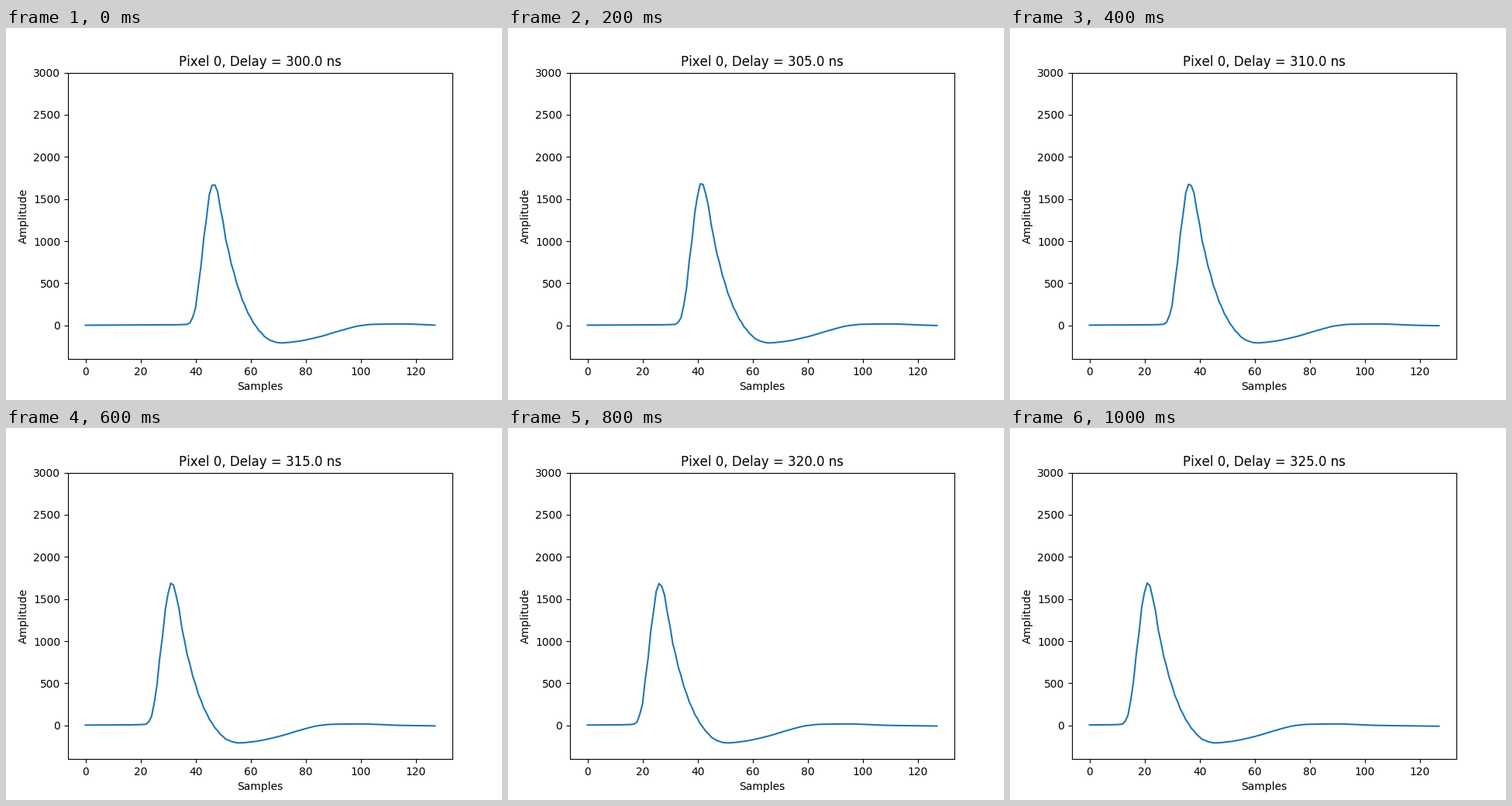
A matplotlib script for the animation above (1200 ms loop, 640 by 480 pixels).

```python
import numpy as np
import matplotlib.pyplot as plt
from matplotlib.animation import FuncAnimation

FRAMES, INTERVAL = 6, 200
SAMPLES = np.arange(128)
SHIFT = 5.07     # samples the pulse moves earlier per step
ODD_SKEW = 0.15  # odd samples are taken slightly late

# Key points (time, amplitude) of the pulse at the shortest delay
KEY_T, KEY_Y = np.array([
    (0, 2), (30, 6), (37, 12), (38.4, 45), (40, 205), (42.15, 750),
    (44.2, 1330), (45.3, 1575), (46.5, 1690), (47.5, 1645), (49.2, 1385),
    (51.15, 1015), (54.2, 600), (57.1, 305), (60.1, 90), (63.2, -62),
    (67, -174), (71, -208), (77, -190), (85, -136), (93, -60), (100, -3),
    (105, 13), (115, 17), (130, 0), (153, -10),
]).T


def smooth_curve(t, x, y):
    """Monotone cubic curve through the points (x, y)."""
    h = np.diff(x)
    d = np.diff(y) / h
    a, b = d[:-1], d[1:]
    inner = np.where(a * b > 0, 2 * a * b / (np.abs(a) + np.abs(b)), 0)
    m = np.concatenate(([d[0]], inner * np.sign(a), [d[-1]]))
    k = np.clip(np.searchsorted(x, t, side="right") - 1, 0, len(h) - 1)
    s = (t - x[k]) / h[k]
    blend = s * s * (3 - 2 * s)
    bend = s * (1 - s) * (m[k] * (1 - s) - m[k + 1] * s)
    return y[k] + blend * (y[k + 1] - y[k]) + h[k] * bend


def waveform(step):
    time = SAMPLES + ODD_SKEW * (SAMPLES % 2) + SHIFT * step
    return smooth_curve(time, KEY_T, KEY_Y)


plt.rcParams["text.kerning_factor"] = 6
fig, ax = plt.subplots(figsize=(6.4, 4.8), dpi=100)
line, = ax.plot(SAMPLES, waveform(0))
ax.set_ylim(-400, 3000)
ax.set_xlabel("Samples")
ax.set_ylabel("Amplitude")
title = ax.set_title("")


def update(step):
    line.set_ydata(waveform(step))
    title.set_text(f"Pixel 0, Delay = {300 + 5 * step:.1f} ns")
    return line, title


anim = FuncAnimation(fig, update, frames=FRAMES, interval=INTERVAL,
                     repeat=True, repeat_delay=0)
plt.show()
```
